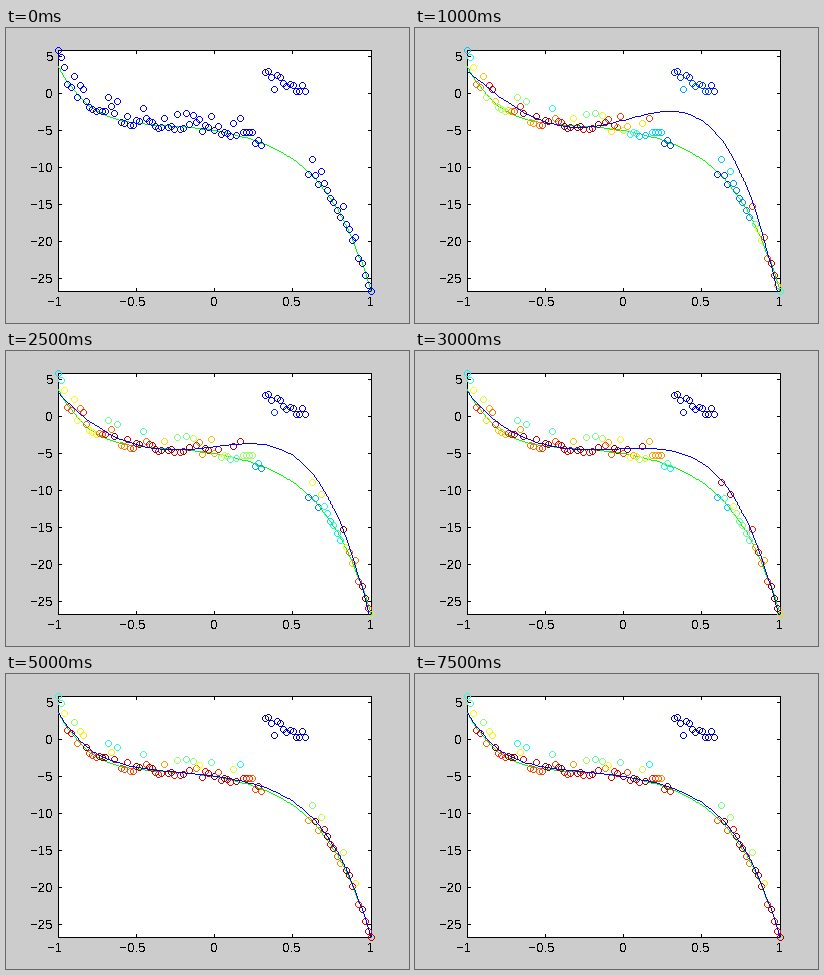
Animation of 403 by 295 pixels, one loop 8000 ms. Source, as a matplotlib script:

```python
import numpy as np
import matplotlib.pyplot as plt
from matplotlib.animation import FuncAnimation

W, H, DPI = 403, 295, 100
LEFT, RIGHT, TOP, BOTTOM = 52, 365, 22, 263
FRAMES, DEGREE = 16, 5
BLUE, GREEN = (0, 0, 1), (0, 1, 0)
FONT = 13.3 * 72 / DPI

plt.rcParams["font.family"] = "Liberation Sans"
plt.rcParams["text.antialiased"] = False
plt.rcParams["text.hinting_factor"] = 1

xs = np.linspace(-1, 1, 101)
cols = np.rint(LEFT + (RIGHT - LEFT) * (xs + 1) / 2).astype(int)


def poly(*knots):
    """Pixel heights of the polynomial through evenly spaced knots."""
    at = np.linspace(-1, 1, DEGREE + 1)
    return np.polyval(np.polyfit(at, knots, DEGREE), xs)


truth = poly(38, 92, 98.5, 109.5, 144, 264)
plain_fit = poly(43, 87, 98, 83, 105, 279)
robust_fit = poly(38, 89.5, 98.3, 108.5, 141, 264.5)

# Samples lie mostly above the true curve, plus one block of outliers
rng = np.random.default_rng(7)
samples = truth + 3 - 22 * rng.random(xs.size) ** 2
block = (xs > .31) & (xs < .59)
samples[block] = np.linspace(46, 63, block.sum()) + rng.normal(0, 5, block.sum())
samples = np.clip(np.rint(samples), TOP, BOTTOM).astype(int)
samples[[0, -1]] = TOP, BOTTOM


def fit(step):
    """The fit lets go of the outliers along a logistic curve."""
    pull = 1 / (1 + np.exp((step - 5.7) / 1.25))
    return robust_fit + pull * (plain_fit - robust_fit)


def jet(v):
    return np.clip(1.5 - np.abs(4 * v[:, None] - np.array([3, 2, 1])), 0, 1)


def draw_curve(img, heights, color):
    rows = np.rint(heights).astype(int)
    for x0, y0, x1, y1 in zip(cols, rows, cols[1:], rows[1:]):
        n = max(abs(x1 - x0), abs(y1 - y0)) + 1
        x = np.rint(np.linspace(x0, x1, n)).astype(int)
        y = np.rint(np.linspace(y0, y1, n)).astype(int)
        inside = (y >= TOP) & (y <= BOTTOM)
        img[y[inside], x[inside]] = color


dy, dx = np.mgrid[-3:4, -3:4]
ring = np.rint(np.hypot(dx, dy)) == 3
dy, dx = dy[ring], dx[ring]


def draw_rings(img, colors):
    for x, y, color in zip(cols, samples, colors):
        img[y + dy, x + dx] = color


fig = plt.figure(figsize=(W / 100, H / 100), dpi=DPI, facecolor="#cccccc")
ax = fig.add_axes([0, 0, 1, 1])
ax.axis("off")

# Plot area, frame and ticks
base = np.full((H, W, 3), .8)
base[TOP:BOTTOM + 1, LEFT:RIGHT + 1] = 0
base[TOP + 1:BOTTOM, LEFT + 1:RIGHT] = 1


def label(x, y, v, align):
    ax.text(x, y, f"{v:g}".replace("-", "\u2212"), size=FONT,
            ha=align, va="baseline")


for v in np.linspace(-1, 1, 5):
    x = int(LEFT + (RIGHT - LEFT) * (v + 1) / 2)
    base[TOP:TOP + 4, x] = base[BOTTOM - 3:BOTTOM + 1, x] = 0
    label(x - 3 * (v < 0), 278, v, "center")
for v in range(-25, 6, 5):
    y = int(65.4 - 7.4 * v)
    base[y, LEFT:LEFT + 4] = base[y, RIGHT - 3:RIGHT + 1] = 0
    label(47.5, y + 5, v, "right")
draw_curve(base, truth, GREEN)

view = ax.imshow(base, extent=(0, W, H, 0), aspect="auto",
                 interpolation="nearest")


def draw(step):
    img = base.copy()
    if step == 0:
        draw_rings(img, [BLUE] * xs.size)
    else:
        model = fit(step)
        weight = 1 / (1 + (np.abs(samples - model) / 12.5) ** 1.5)
        draw_rings(img, jet(weight))
        draw_curve(img, model, BLUE)
    view.set_data(img)
    return view,


anim = FuncAnimation(fig, draw, frames=FRAMES, interval=500,
                     init_func=lambda: draw(0), repeat=True, repeat_delay=0)
plt.show()
```
